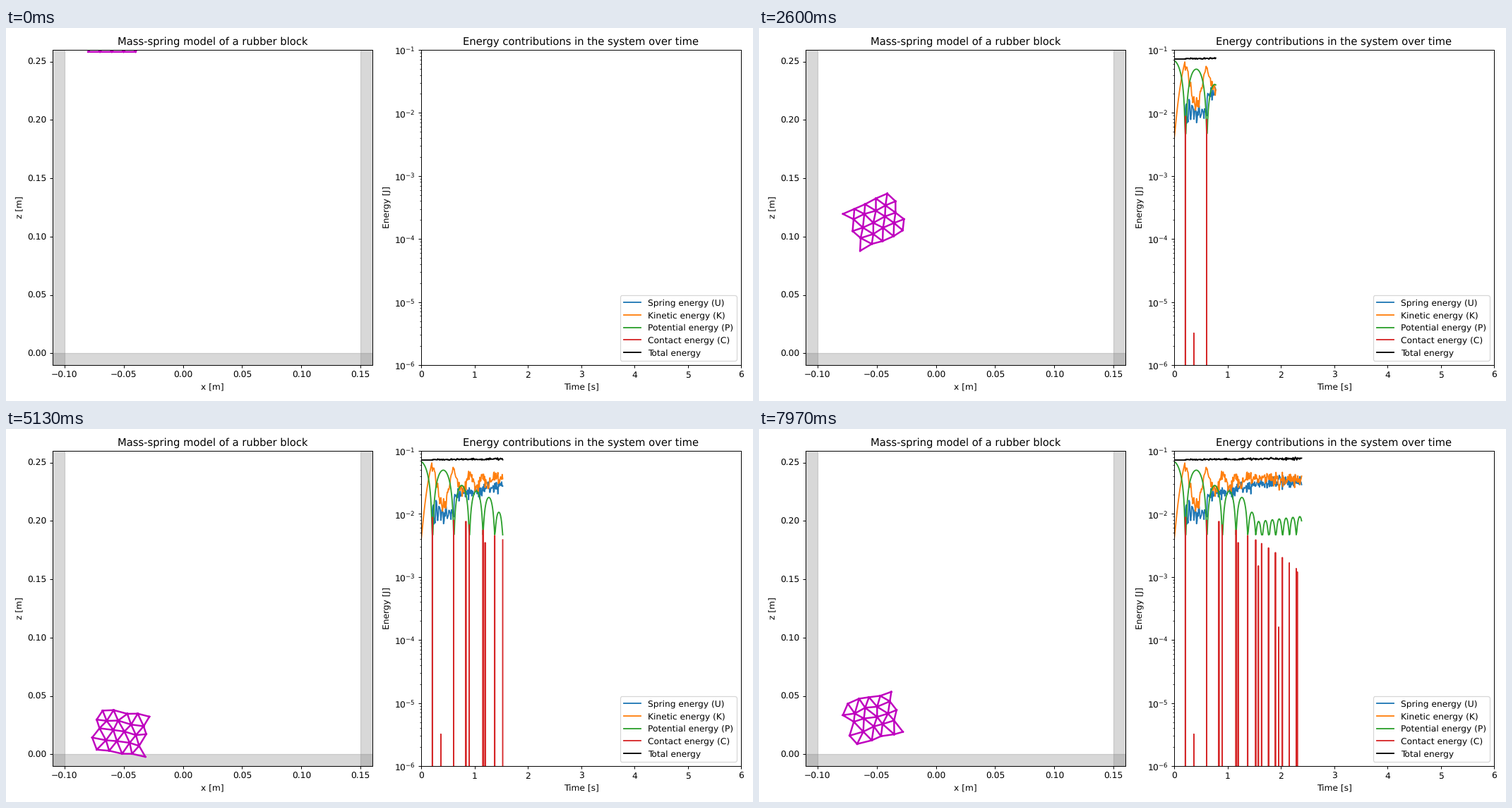
A matplotlib script that plays this animation: 1058x529 px, repeating every 8000 ms.

```python
import numpy as np
import matplotlib.pyplot as plt
from matplotlib.animation import FuncAnimation

W, H = 1058, 529
LOOP_MS, STEPS, DT = 8000, 240, 0.01
G, MASS = 9.81, 0.025
N, SPACING = 5, 0.01          # nodes per side of the block, spring length
FLOOR = 0.019                 # lowest height of the block's centre
RIGHT, LEFT = 0.127, -0.079   # where the centre turns at the walls

plt.rcParams["text.hinting"] = "none"
rng = np.random.default_rng(4)
times = np.arange(STEPS) * DT

# Free flights as (time, height) of their apex: large bounces, then small hops.
flights = [(-.0255, .2788), (.415, .2015), (.76, .1154),
           (1.035, .0938), (1.27, .0745), (1.457, .0434)]
flights += zip(np.linspace(1.585, 2.357, 7), np.linspace(.031, .037, 7))

# Wall contacts as (time, contact energy), right wall first.
wall_hits = [(.37, 3.2e-6), (.845, 7.6e-3), (1.2, 3.5e-3),
             (1.58, 1.5e-3), (1.965, 1.6e-4), (2.32, 1.2e-3)]
SPIN_START = wall_hits[0][0]


# --- motion of the block ----------------------------------------------------
def centre_x(t):
    turn_t = [0] + [hit for hit, _ in wall_hits] + [2.87]
    turn_x = [-.058] + [RIGHT, LEFT] * 3 + [RIGHT]
    return np.interp(t, turn_t, turn_x)


def centre_z(t):
    return max(FLOOR, *(h - G / 2 * (t - t0) ** 2 for t0, h in flights))


def angle(t):
    """Degrees turned; the spin grows after the first wall contact."""
    s = max(t - SPIN_START, 0)
    return s * (20 + 90 * s + 18 * s ** 2)


def floor_hits():
    """Times at which one flight's parabola meets the next."""
    return [(t0 + t1) / 2 + (h0 - h1) / (G * (t1 - t0))
            for (t0, h0), (t1, h1) in zip(flights, flights[1:])]


FIRST_HIT, SECOND_HIT = floor_hits()[:2]


# --- mesh, with nodes as complex numbers x + iz -----------------------------
def rest_shape():
    row, col = np.divmod(np.arange(N * N), N)
    nodes = SPACING * (col + row % 2 / 2 + 1j * row * np.sqrt(3) / 2)
    return nodes - nodes.mean()


def mesh_edges():
    edges = []
    for r in range(N):
        for c in range(N):
            near = [(r, c + 1), (r + 1, c), (r + 1, c + (1 if r % 2 else -1))]
            edges += [(r * N + c, i * N + j) for i, j in near
                      if i < N and 0 <= j < N]
    return np.array(edges)


REST, EDGES = rest_shape(), mesh_edges()
wob_rate = rng.uniform(9, 17, (2, N * N))
wob_phase = rng.uniform(0, 2 * np.pi, (2, N * N))


def mesh(t):
    local = REST
    if t > FIRST_HIT:
        wx, wz = np.sin(2 * np.pi * wob_rate * t + wob_phase)
        local = REST + (.0005 + .0004 * t) * (wx + 1j * wz)
    turn = np.exp(1j * np.radians(angle(t)))
    nodes = centre_x(t) + 1j * centre_z(t) + local * turn
    return np.clip(nodes.real, -.104, .154), np.maximum(nodes.imag, -.0035)


def edge_path(t):
    """All springs as one line, broken by NaN."""
    out = []
    for v in mesh(t):
        gaps = np.full((len(EDGES), 3), np.nan)
        gaps[:, :2] = v[EDGES]
        out.append(gaps.ravel())
    return out


# --- energies ---------------------------------------------------------------
def contact_energy():
    energy = np.zeros(STEPS)
    hits = [(t, .009 * np.exp(-(.6 * t) ** 2)) for t in floor_hits()]
    for t, e in hits + wall_hits:
        energy[int(t / DT)] = e
    return energy


def noise():
    return np.clip(rng.standard_normal(STEPS), -2, 2)


def energies():
    fallen = times > FIRST_HIT - DT
    potential = MASS * G * np.array([centre_z(t) for t in times])
    contact = contact_energy()

    since = times - FIRST_HIT
    level = np.where(times < SECOND_HIT, .0102,
                     np.minimum(.019 + .01 * (times - SECOND_HIT), .033))
    ringing = .45 * np.exp(-since / .3) * np.cos(2 * np.pi * (since - .01) / .06)
    spring = np.where(fallen, level * (1 + ringing + .13 * noise()), 0)

    drift = .0013 + .0012 * since + (.0006 + .0007 * times) * noise()
    total = .0715 + np.where(fallen, drift, 0)
    kinetic = total - potential - spring - contact
    return spring, kinetic, potential, contact, total


# --- figure -----------------------------------------------------------------
fig = plt.figure(figsize=(12, 6), dpi=W / 12)


def add_plot(left):
    return fig.add_axes([left / W, 51 / H, 453 / W, 447 / H])


ax = add_plot(66)
wall = dict(color="gray", alpha=.3)
ax.axvspan(-.2, -.1, **wall)
ax.axvspan(.15, .25, **wall)
ax.axhspan(-.1, 0, **wall)
block, = ax.plot([], [], "m", lw=2)
ax.set(xlim=(-.11, .16), ylim=(-.01, .26), xlabel="x [m]", ylabel="z [m]",
       title="Mass-spring model of a rubber block")

ax2 = add_plot(588)
LABELS = ["Spring energy (U)", "Kinetic energy (K)", "Potential energy (P)",
          "Contact energy (C)", "Total energy"]
COLORS = ["tab:blue", "tab:orange", "tab:green", "tab:red", "black"]
ax2.set_yscale("log", nonpositive="clip")
curves = [ax2.plot([], [], color=c, label=s)[0] for c, s in zip(COLORS, LABELS)]
ax2.set(xlim=(0, 6), ylim=(1e-6, 1e-1), xlabel="Time [s]", ylabel="Energy [J]",
        title="Energy contributions in the system over time")
ax2.legend(loc="lower right")

series = energies()


def update(i):
    block.set_data(*edge_path(times[i]))
    n = i + 1 if i else 0  # a single sample leaves no mark
    for curve, values in zip(curves, series):
        curve.set_data(times[:n], values[:n])
    return [block, *curves]


anim = FuncAnimation(fig, update, frames=STEPS, interval=LOOP_MS / STEPS,
                     init_func=lambda: update(0), repeat=True, repeat_delay=0)
plt.show()
```
